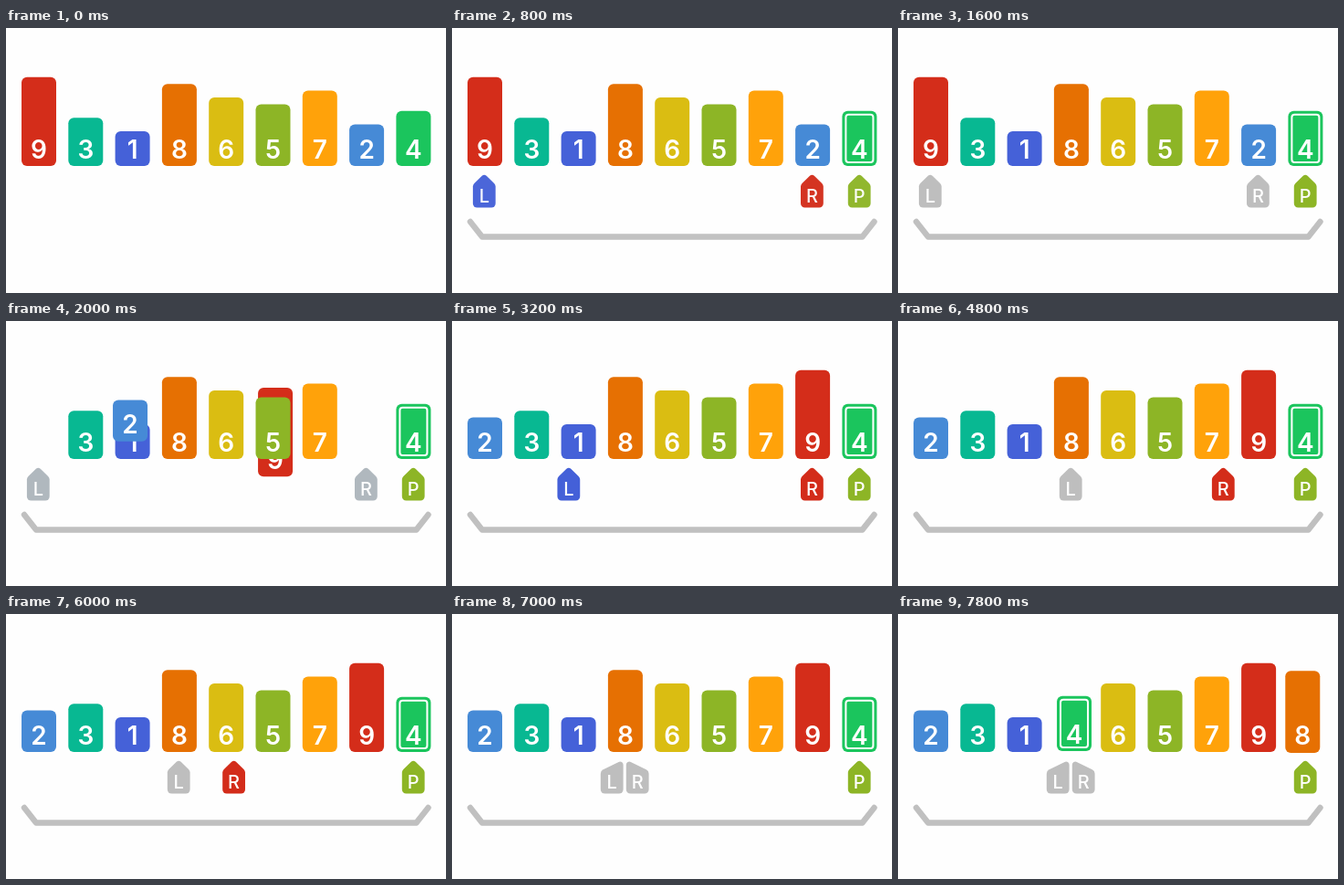
An HTML page with a canvas for the animation above (8 s loop, 482 by 290 pixels).

```html
<!DOCTYPE html>
<html lang="en">
<head>
<meta charset="utf-8">
<title>Quicksort partition</title>
<style>
html, body { margin: 0; width: 100%; height: 100%; overflow: hidden; background: #fefefe; }
canvas { display: block; width: 482px; height: 290px; }
</style>
</head>
<body>
<canvas id="stage"></canvas>
<script>
const W = 482, H = 290, LOOP = 8000;
const canvas = document.getElementById('stage');
const ctx = canvas.getContext('2d');
const dpr = window.devicePixelRatio || 1;
canvas.width = W * dpr;
canvas.height = H * dpr;

const GAP = 51.3, BAR_W = 38, FLOOR = 151;
const VALUES = [9, 3, 1, 8, 6, 5, 7, 2, 4];
const BAR_COLORS = ['', '#4561d8', '#468ad6', '#08b892', '#1bc55d', '#8db526',
  '#dabd12', '#ffa20a', '#e67002', '#d42d1a'];
const BLUE = [68, 96, 216], RED = [211, 44, 26], GREEN = [141, 181, 38];
const GREY = [190, 190, 190], COOL = [176, 184, 190];

// Timeline, in ms
const STEP = 582;
const SWAP1 = 1625, LEFT = SWAP1 + STEP, LEFT_END = LEFT + 3 * STEP;
const RIGHT = 4416, RIGHT_END = RIGHT + 4 * STEP, SWAP2 = 7260;

const clamp = v => Math.max(0, Math.min(1, v));
const span = (t, start, length) => clamp((t - start) / length);
const ease = p => (1 - Math.cos(Math.PI * p)) / 2;
const move = (t, start) => ease(span(t, start, STEP));
const mix = (a, b, p) => a.map((v, i) => v + (b[i] - v) * p);
const rgb = c => `rgb(${c.map(Math.round).join(',')})`;

function steps(t, start, count) {
  let sum = 0;
  for (let i = 0; i < count; i++) sum += move(t, start + i * STEP);
  return sum;
}

function text(str, x, y, font) {
  ctx.font = font + ' Inter, sans-serif';
  ctx.textAlign = 'center';
  ctx.fillStyle = '#fff';
  ctx.fillText(str, x, y);
}

function roundBox(x, y, w, h, r) {
  ctx.beginPath();
  ctx.roundRect(x, y, w, h, r);
}

function drawBar(value, slot, dy, outline) {
  const h = 30.6 + 7.4 * value;
  const x = 17 + GAP * slot, y = FLOOR - h + dy;
  ctx.fillStyle = BAR_COLORS[value];
  roundBox(x, y, BAR_W, h, 6);
  ctx.fill();
  if (outline > 0) {
    ctx.save();
    ctx.globalAlpha = outline;
    ctx.strokeStyle = '#fff';
    ctx.lineWidth = 2;
    roundBox(x + 4, y + 4, BAR_W - 8, h - 8, 3);
    ctx.stroke();
    ctx.restore();
  }
  text(value, x + BAR_W / 2, 142.5 + dy, '600 28px');
}

// tip shifts the apex sideways: -1 left edge, 0 middle, 1 right edge
function drawMarker(letter, x, color, tip) {
  const w = 12.4, shoulder = 171.5, apex = 159.5, base = 196.5;
  const left = x - w, right = x + w, top = x + w * tip;
  ctx.beginPath();
  ctx.moveTo(left, 184);
  ctx.arcTo(left, shoulder, top, apex, 5);
  ctx.arcTo(top, apex, right, shoulder, 3.5);
  ctx.arcTo(right, shoulder, right, base, 5);
  ctx.arcTo(right, base, left, base, 4.5);
  ctx.arcTo(left, base, left, 184, 4.5);
  ctx.closePath();
  ctx.fillStyle = rgb(color);
  ctx.fill();
  text(letter, x, 191, '500 20px');
}

function drawBracket() {
  ctx.beginPath();
  ctx.moveTo(20, 212);
  ctx.lineTo(33, 228.5);
  ctx.lineTo(449.5, 228.5);
  ctx.lineTo(462.5, 212);
  ctx.lineWidth = 6.4;
  ctx.lineCap = ctx.lineJoin = 'round';
  ctx.strokeStyle = '#c0c0c0';
  ctx.stroke();
}

function markerColor(t, active, stop) {
  const idle = mix(GREY, COOL, span(t, SWAP1, 250));
  if (t < SWAP1 + STEP) return mix(active, idle, span(t, 1250, 300));
  if (t < stop) return mix(COOL, active, span(t, LEFT, 200));
  return mix(active, GREY, span(t, stop, 250));
}

function draw(t) {
  ctx.setTransform(dpr, 0, 0, dpr, 0, 0);
  ctx.fillStyle = '#fefefe';
  ctx.fillRect(0, 0, W, H);

  const shown = ease(span(t, 100, 800));
  const swaps = [
    { from: 0, to: 7, p: move(t, SWAP1) },
    { from: 3, to: 8, p: move(t, SWAP2) }
  ];
  VALUES.forEach((value, i) => {
    let slot = i, dy = 0;
    for (const { from, to, p } of swaps) {
      if (i !== from && i !== to) continue;
      const dir = i === from ? 1 : -1;
      slot = i + dir * (to - from) * p;
      dy = dir * 25 * Math.sin(Math.PI * p);
    }
    drawBar(value, slot, dy, value === 4 ? shown : 0);
  });

  const split = move(t, RIGHT_END - STEP);
  const at = slot => 35.3 + GAP * slot;
  ctx.globalAlpha = shown;
  drawBracket();
  drawMarker('L', at(steps(t, LEFT, 3)) - 14 * split, markerColor(t, BLUE, LEFT_END), split);
  drawMarker('R', at(7 - steps(t, RIGHT, 4)) + 14 * split, markerColor(t, RED, RIGHT_END), -split);
  drawMarker('P', at(8) + 0.5, GREEN, 0);
  ctx.globalAlpha = 1;
}

const begin = performance.now();
function tick() {
  draw((performance.now() - begin) % LOOP);
  requestAnimationFrame(tick);
}
tick();
</script>
</body>
</html>
```
